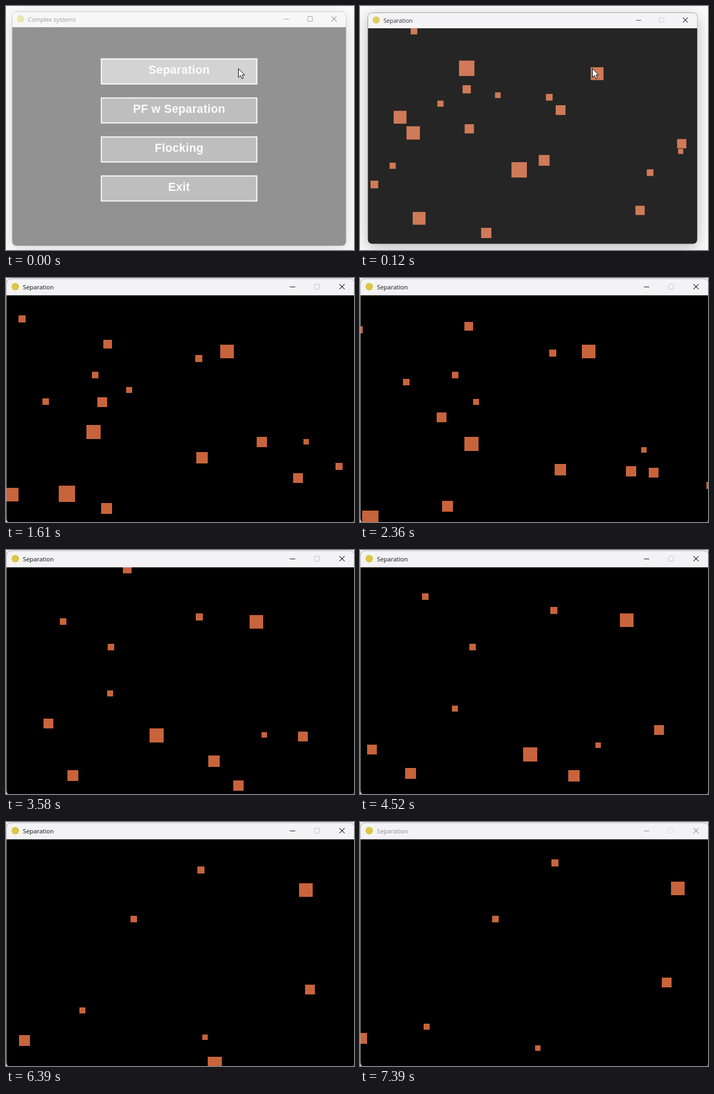
Recreate the animation shown at these times as an HTML page. Size 640 px wide and 450 px high, loop 7.42 s.

```html
<!DOCTYPE html>
<html lang="en">
<head>
<meta charset="utf-8">
<title>Separation</title>
<style>
html, body { margin: 0; width: 100%; height: 100%; overflow: hidden; background: #fafafa; }
#stage { position: relative; width: 640px; height: 450px; overflow: hidden; background: #fafafa; }
.win { position: absolute; left: 1px; top: 2px; width: 640px; height: 450px; border-radius: 8px;
  box-shadow: 0 0 0 1px rgba(0,0,0,.2), 0 8px 30px rgba(0,0,0,.3); }
.frame { position: absolute; inset: 0; border-radius: 8px; overflow: hidden; background: #000; }
#menu { transform-origin: 255px 205px; }
#sim { transform-origin: 252px 198px; }
.bar { position: absolute; left: 0; top: 0; width: 640px; height: 30px; background: #f3f3f6; }
.icon { position: absolute; left: 9px; top: 7px; width: 14px; height: 14px; border-radius: 50%; background: #dcc648; }
.name { position: absolute; left: 30px; top: 0; font: 11.3px/29px "Open Sans", "Noto Sans", sans-serif; color: #111; white-space: pre; }
.bar svg { position: absolute; left: 0; top: 0; fill: none; stroke: #1a1a1a; }
.idle .name, .idle svg { opacity: .45; }
.client { position: absolute; left: 0; top: 30px; width: 640px; height: 420px; overflow: hidden; }
.btn { position: absolute; left: 170px; width: 300px; height: 50px; box-sizing: border-box; border: 2px solid #fff;
  background: #6a6a6a; color: #fff; text-align: center; letter-spacing: .3px;
  font: bold 22.2px/42px "Liberation Sans", Arial, sans-serif; }
.btn.over { background: #9c9c9c; }
.sq { position: absolute; left: 0; top: 0; background: #c8643c; }
#cursor { position: absolute; left: 427px; top: 114px; }
</style>
</head>
<body>
<div id="stage">
  <div class="win" id="menu"></div>
  <div class="win" id="sim"></div>
  <svg id="cursor" width="15" height="22"><path d="M.5 1.5v16.2l3.7-3.5 2.7 5.9 2.6-1.2-2.6-5.7h5z" fill="#fff" stroke="#000"/></svg>
</div>
<script>
const LOOP = 7420, RUN = 140;
const $ = id => document.getElementById(id);
const menu = $('menu'), sim = $('sim'), cursor = $('cursor');

function build(win, title, maxColor) {
  win.innerHTML = `<div class="frame"><div class="bar"><span class="icon"></span><span class="name">${title}</span>
    <svg width="640" height="30"><path d="M521 14.5h10"/>
    <rect x="566.5" y="9.5" width="9" height="9" rx="1" stroke="${maxColor}"/>
    <path d="M612.3 9.3l9.4 9.4m0-9.4l-9.4 9.4" stroke-width="1.2"/></svg></div><div class="client"></div></div>`;
  return win.querySelector('.client');
}

function add(parent, cls, text = '') {
  const el = document.createElement('div');
  el.className = cls;
  el.textContent = text;
  return parent.appendChild(el);
}

const menuBody = build(menu, 'Complex systems', '#1a1a1a');
const simBody = build(sim, 'Separation', '#c4c4c6');
const simBar = sim.querySelector('.bar');

['Separation', 'PF w Separation', 'Flocking', 'Exit'].forEach((label, i) => {
  add(menuBody, i ? 'btn' : 'btn over', label).style.top = 60 + i * 75 + 'px';
});

// A square drifts at a steady velocity (px/s) and may swerve when it meets others.
class Square {
  constructor(size, x, y) {
    Object.assign(this, { size, x, y, legs: [] });
    this.el = add(simBody, 'sq');
    this.el.style.width = this.el.style.height = size + 'px';
  }
  drift(vx, vy) { return this.swerve(0, vx, vy); }
  swerve(from, vx, vy) {
    this.legs.push({ from, vx, vy });
    return this;
  }
  place(s) {
    let { x, y, size, legs } = this;
    legs.forEach(({ from, vx, vy }, i) => {
      const end = i + 1 < legs.length ? legs[i + 1].from : Infinity;
      const span = Math.max(0, Math.min(s, end) - from);
      x += vx * span;
      y += vy * span;
    });
    const snap = v => Math.round(v - size / 2);
    this.el.style.transform = `translate(${snap(x) - 1}px, ${snap(y) - 32}px)`;
  }
}
const square = (...args) => new Square(...args);

const squares = [
  square(13, 90, 37).drift(-41.3, 26.5),
  square(30, 193, 110).drift(0, -224),
  square(25, 63, 205).drift(-90, -86),
  square(12, 142, 179).drift(14.8, 0),
  square(11, 253, 162.6).drift(-18, 29.6),
  square(13, 353, 166.8).drift(.8, -12.6),
  square(12, 49, 300).drift(16.2, -48.8),
  square(30, 294.8, 307.6).drift(-124, 61.3),
  square(21, 343, 289).drift(11.6, 29.1),
  square(18, 611, 257).drift(25.7, -157),
  square(10, 608.8, 272.2).drift(-38.9, 20),
  square(18, 529.7, 387.3).drift(4.7, -12.6),
  square(15, 13, 336.6).drift(-50, 0),
  square(25, 100.6, 402).drift(-61, -2),
  square(20, 231.3, 431.3).drift(-31.5, -4.5),
  square(16, 193, 151).drift(-55, 32.6).swerve(.46, 18.6, -44),
  square(25, 446.6, 120.3).drift(-27.2, 10.1).swerve(1.65, 32.6, -2.6),
  square(19, 375.8, 191.8).drift(64.5, 75).swerve(2.05, -58.2, 64),
  square(26, 88.6, 236).drift(39.7, 35).swerve(.74, 59, 29.6).swerve(3.44, 38, 37),
  square(18, 197.6, 228.2).drift(-14.3, -20.5).swerve(.74, -14.3, 22.3).swerve(1.86, -59, 51.6),
  square(13, 549.2, 313.3).drift(48, -44).swerve(.38, 41.2, 46.6)
];

const progress = (t, from, length) => Math.min(1, Math.max(0, (t - from) / length));

function show(win, alpha, scale) {
  win.style.opacity = alpha;
  win.style.transform = scale === 1 ? 'none' : `scale(${scale})`;
}

function draw(t) {
  const out = progress(t, 0, 90), left = 1 - progress(t, 30, 240);
  show(menu, .415 * (1 - out), .96 - .06 * out);
  show(sim, 1 - left ** 4, 1 - .14 * left ** 2);
  const s = Math.max(0, t - RUN) / 1000;
  squares.forEach(sq => sq.place(s));
  cursor.style.display = t < 300 ? 'block' : 'none';
  simBar.classList.toggle('idle', t >= 7360);
}

const start = performance.now();
function tick() {
  draw((performance.now() - start) % LOOP);
  requestAnimationFrame(tick);
}
tick();
</script>
</body>
</html>
```
